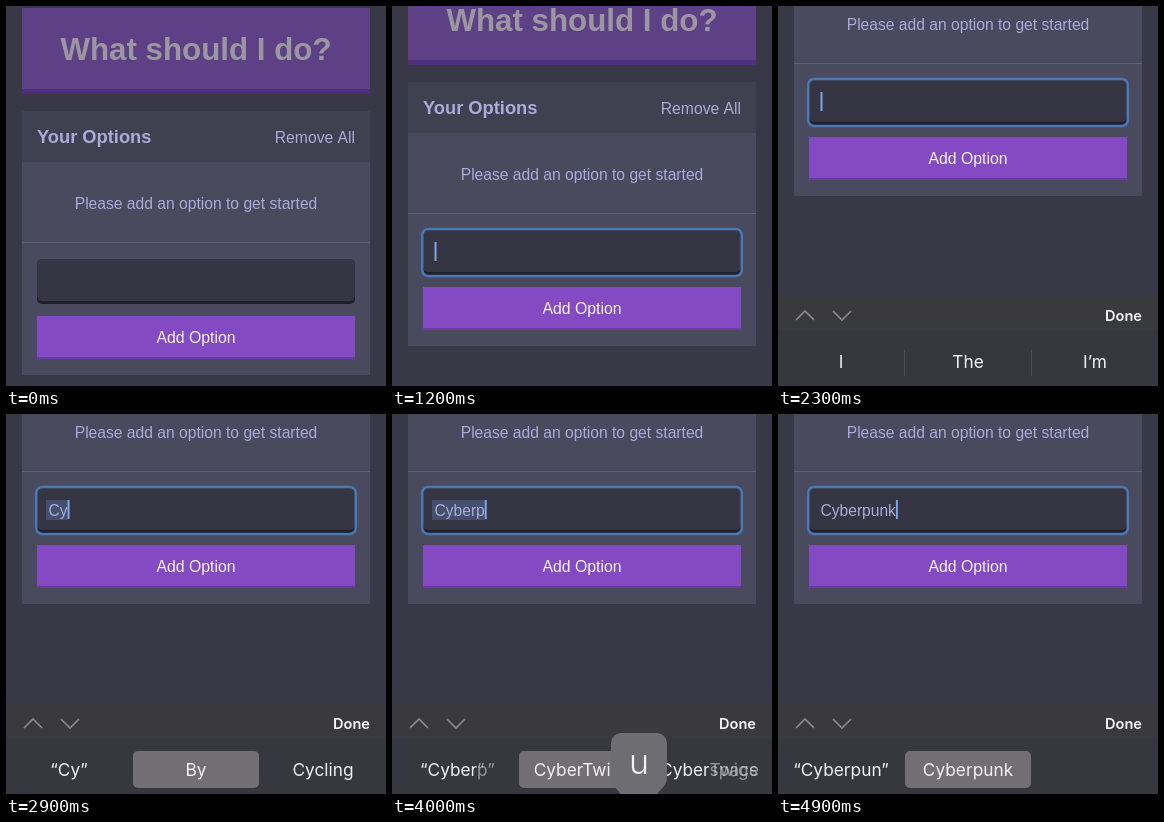
Animation of 380 by 380 pixels, one loop 5000 ms. Source, as an HTML page with a canvas:

```html
<!DOCTYPE html>
<html lang="en">
<head>
<meta charset="utf-8">
<style>
  html, body { margin: 0; width: 100%; height: 100%; overflow: hidden; background: #383846; }
  canvas { display: block; }
</style>
</head>
<body>
<canvas id="stage" width="380" height="380"></canvas>
<script>
const ctx = document.getElementById('stage').getContext('2d');
const LOOP = 5000, STEP = 100, FOCUS = 1200, FADE = 200;
const PAGE = '"Liberation Sans", Arial, sans-serif';
const KEYS = 'Inter, Roboto, sans-serif';
const INK = '#aaabd8';

// Time at which the field reaches each text
const typed = [
  [0, ''], [2500, 'C'], [2700, 'Cy'], [3000, 'Cyb'], [3200, 'Cybe'], [3400, 'Cyber'],
  [3900, 'Cyberp'], [4100, 'Cyberpu'], [4400, 'Cyberpun'], [4800, 'Cyberpunk']
];
// Time and the three words of the suggestion bar
const hints = [
  [0, 'I', 'The', 'I’m'],
  [2500, '“C”', 'Can', 'Could'],
  [2700, '“Cy”', 'By', 'Cycling'],
  [3000, '“Cyb”', 'Cub', 'Cyber'],
  [3200, '“Cybe”', 'Cube', 'CyberTwigs'],
  [3400, '“Cyber”', 'CyberTwigs', 'Cyberspace'],
  [3900, '“Cyberp”', 'CyberTwigs', 'CyberTwigs'],
  [4100, '“Cyberpu”', 'Cyberpunk', ''],
  [4400, '“Cyberpun”', 'Cyberpunk', '']
];
// Key previews: letter, centre, top, shown from, shown until
const previews = [
  ['y', 209, 319, 2600, 2800], ['e', 95, 319, 3100, 3300], ['r', 133, 319, 3300, 3500],
  ['p', 350, 319, 3800, 4000], ['u', 247, 319, 4000, 4200], ['k', 304, 373, 4700, 4900]
];

const lastIndex = (list, t) => list.findLastIndex(item => item[0] <= t);

function box(x, y, w, h, color, radius = 0) {
  ctx.fillStyle = color;
  ctx.beginPath();
  ctx.roundRect(x, y, w, h, radius);
  ctx.fill();
}

function text(str, x, y, font, color, align = 'left') {
  ctx.font = font;
  ctx.fillStyle = color;
  ctx.textAlign = align;
  ctx.fillText(str, x, y);
}

function line(points, color, width) {
  ctx.strokeStyle = color;
  ctx.lineWidth = width;
  ctx.beginPath();
  points.forEach(p => ctx.lineTo(...p));
  ctx.stroke();
}

function drawField(t, marked) {
  const value = typed[lastIndex(typed, t)][1];
  const font = '15.6px ' + PAGE;
  box(31, 253, 318, 45, '#201f2a', 5);
  box(31, 253, 318, 42, '#363543', 5);
  if (t < FOCUS) return;

  ctx.strokeStyle = '#4779b5';
  ctx.lineWidth = 2.5;
  ctx.beginPath();
  ctx.roundRect(30.2, 252, 319.6, 47, 6);
  ctx.stroke();

  ctx.font = font;
  const end = 43 + ctx.measureText(value).width;
  if (marked) box(40, 265, end - 40, 20, '#45506f');
  text(value, 42.5, 280.5, font, INK);
  if (t < 1900 || t >= 2300) box(end - 0.5, 265, 2, 19, '#7ba4ea');
}

function drawPage(t, marked) {
  const u = Math.min(1, Math.max(0, (t - 1097) / 300));
  const scroll = 179 * (u < 0.5 ? 4 * u ** 3 : 1 - 4 * (1 - u) ** 3);
  ctx.save();
  ctx.translate(0, -Math.round(scroll));

  box(16, 2, 348, 86, '#4f2f7b');
  box(16, 2, 348, 81, '#5e4086');
  text('What should I do?', 190, 53.5, 'bold 31.3px ' + PAGE, '#9b97a1', 'center');

  box(16, 105, 348, 264, '#494a5e');
  box(16, 105, 348, 51, '#404150');
  text('Your Options', 31, 137, 'bold 18.3px ' + PAGE, INK);
  text('Remove All', 349, 137, '15.7px ' + PAGE, INK, 'right');
  text('Please add an option to get started', 190, 202.5, '15.65px ' + PAGE, INK, 'center');
  box(16, 236, 348, 1, '#616278');

  drawField(t, marked);

  box(31, 310, 318, 43, '#6c3aa6');
  box(31, 310, 318, 41, '#844ac4');
  text('Add Option', 190, 336.5, '15.8px ' + PAGE, '#f6f2fb', 'center');
  ctx.restore();
}

// The shared beginning slides while the endings cross-fade
function morph(from, to, cx, y, k) {
  ctx.font = '17.3px ' + KEYS;
  ctx.fillStyle = '#f1f1f4';
  ctx.textAlign = 'left';
  let n = 0;
  while (n < from.length && from[n] === to[n]) n++;
  const width = s => ctx.measureText(s).width;
  const x = cx - (width(from) * (1 - k) + width(to) * k) / 2;
  const head = to.slice(0, n);
  ctx.fillText(head, x, y);
  for (const [word, alpha] of [[from, 1 - k], [to, k]]) {
    ctx.globalAlpha = alpha;
    ctx.fillText(word.slice(n), x + width(head), y);
  }
  ctx.globalAlpha = 1;
}

function drawKeyboard(t, index, k) {
  if (t < FOCUS) return;
  ctx.save();
  ctx.translate(0, Math.round(92 * Math.exp((FOCUS - t) / 88)));
  box(0, 288, 380, 36, '#3a393d');
  box(0, 324, 380, 56, '#373740');
  line([[18, 314], [27, 305], [36, 314]], '#8b8a90', 1.6);
  line([[55, 305], [64, 314], [73, 305]], '#8b8a90', 1.6);
  text('Done', 364, 315, '600 14.6px ' + KEYS, '#f5f5f7', 'right');

  if (index) {
    box(127, 337, 126, 37, '#716f73', 5);
  } else {
    box(126, 344, 1, 26, '#4b4b54');
    box(253, 344, 1, 26, '#4b4b54');
  }
  const now = hints[index], before = hints[Math.max(0, index - 1)];
  [63, 190, 317].forEach((cx, i) => morph(before[i + 1], now[i + 1], cx, 362, k));
  ctx.restore();
}

function drawPreview(letter, cx, top) {
  const l = cx - 28, r = cx + 28, low = top + 44, foot = top + 68;
  ctx.fillStyle = '#6e6d72';
  ctx.beginPath();
  ctx.moveTo(l, low);
  ctx.arcTo(l, top, cx, top, 10);
  ctx.arcTo(r, top, r, low, 10);
  ctx.lineTo(r, low);
  ctx.bezierCurveTo(r, low + 12, cx + 17, low + 12, cx + 17, foot);
  ctx.lineTo(cx - 17, foot);
  ctx.bezierCurveTo(cx - 17, low + 12, l, low + 12, l, low);
  ctx.fill();
  text(letter, cx, top + 41, '300 34px ' + KEYS, '#f4f4f6', 'center');
}

function draw(t) {
  const index = lastIndex(hints, t);
  const k = index ? Math.min(1, (t - hints[index][0]) / FADE) : 1;
  const value = typed[lastIndex(typed, t)][1];
  const marked = index > 0 && k >= 0.5 && hints[index][1] === `“${value}”`;

  box(0, 0, 380, 380, '#383846');
  drawPage(t, marked);
  drawKeyboard(t, index, k);
  for (const [letter, cx, top, from, until] of previews) {
    if (t >= from && t < until) drawPreview(letter, cx, top);
  }
}

const start = performance.now();
function tick() {
  const t = (performance.now() - start) % LOOP;
  draw(Math.floor(t / STEP) * STEP);
  requestAnimationFrame(tick);
}
tick();
</script>
</body>
</html>
```
